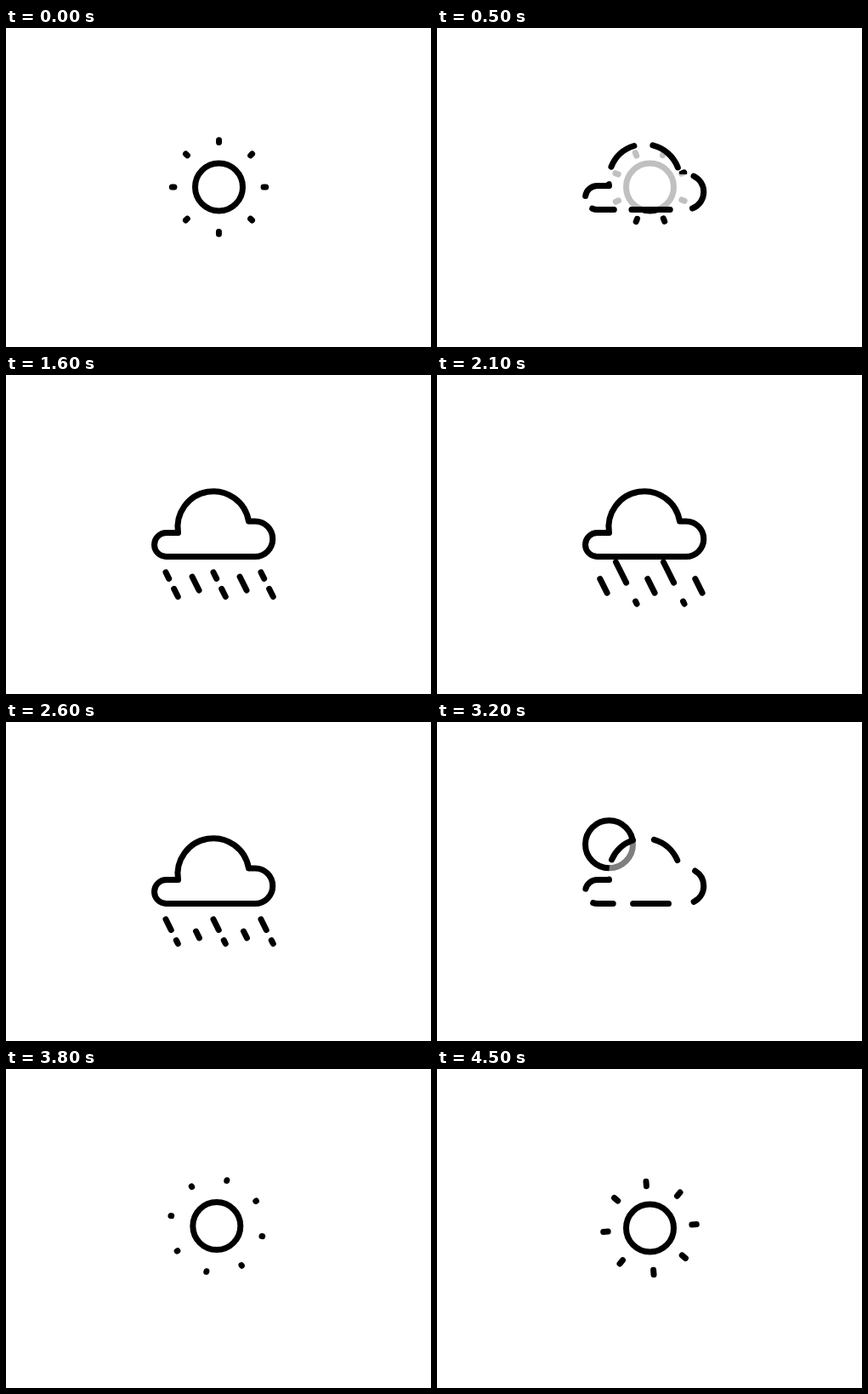
Recreate the animation shown at these times as an HTML page with a canvas. Size 500x375 px, loop 4.6 s.

```html
<!DOCTYPE html>
<html lang="en">
<head>
<meta charset="utf-8">
<title>Weather loop</title>
<style>
  html, body { margin: 0; width: 100%; height: 100%; overflow: hidden; background: #fff; }
  canvas { display: block; }
</style>
</head>
<body>
<canvas width="500" height="375"></canvas>
<script>
const ctx = document.querySelector('canvas').getContext('2d');
const LOOP = 4600;
const cloud = new Path2D('M188.5 213.5a14 14 0 0 1 0-28h14A42 42 0 0 1 285.5 172h7.5a20.75 20.75 0 0 1 0 41.5z');
const cells = [56, 59, 64, 75, 71, 43]; // outline pieces between the gaps
const firstGap = 13.75;

const clamp = v => Math.max(0, Math.min(1, v));
const ramp = (t, from, to) => clamp((t - from) / (to - from));
const quint = u => u < 0.5 ? 16 * u ** 5 : 1 - 16 * (1 - u) ** 5;

function line(x1, y1, x2, y2) {
  ctx.beginPath();
  ctx.moveTo(x1, y1);
  ctx.lineTo(x2, y2);
  ctx.stroke();
}

function drawSun(t) {
  const away = quint(ramp(t, 2630, 3030)) - quint(ramp(t, 3530, 3930));
  ctx.save();
  ctx.translate(250.5 - 48 * away, 187 - 43.2 * away);
  ctx.beginPath();
  ctx.arc(0, 0, 28, 0, 2 * Math.PI);
  ctx.stroke();

  const phase = (t - 2350) % 900;
  if (phase < 640) {
    const radius = u => 55.2 - 15 * (1 - clamp(u)) ** 2;
    const inner = radius((phase - 155) / 510);
    const outer = radius(phase / 400);
    const s = (t - LOOP) / 1000;
    ctx.rotate((48.9 * s + (s < 0 ? 10.5 : -10.5) * s * s) * Math.PI / 180);
    for (let i = 0; i < 8; i++) {
      line(0, -inner, 0, -outer);
      ctx.rotate(Math.PI / 4);
    }
  }
  ctx.restore();
}

function drawCloud(t) {
  const shown = ramp(t, 150, 700) - ramp(t, 2975, 3525);
  if (shown <= 0) return;
  ctx.globalAlpha = ramp(t, 200, 600) - ramp(t, 3000, 3400);
  ctx.fill(cloud);
  ctx.globalAlpha = 1;
  if (shown < 1) {
    const half = (1 - shown) / 2;
    ctx.setLineDash(cells.flatMap((c, i) => [c * shown, (c + cells[(i + 1) % cells.length]) * half]));
    ctx.lineDashOffset = -(firstGap + cells[0] * half);
  }
  ctx.stroke(cloud);
  ctx.setLineDash([]);
}

// A streak that wraps around along a slanted track
function drawDrop(x, y, height, tail, length) {
  if (length <= 0) return;
  const piece = (a, b) => line(x + a * height / 2, y + a * height, x + b * height / 2, y + b * height);
  tail -= Math.floor(tail);
  const head = tail + length;
  piece(tail, Math.min(head, 1));
  if (head > 1) piece(0, head - 1);
}

function drawRain(t) {
  const s = t / 1000;
  const long = Math.min(0.32 + 0.37 * (s - 0.9), 0.58, 1.15 * (3.1 - s));
  const late = Math.min(0.46 * (s - 0.9), 1.07 * (2.75 - s));
  const longTail = 0.43 + 1.18 * (s - 0.9) - long;
  const lateTail = 0.35 + 1.18 * (s - 1.6);
  for (const x of [188, 244, 300]) drawDrop(x, 232, 28.5, longTail, long);
  for (const x of [210.5, 266.5]) drawDrop(x, 220, 49, lateTail, late);
}

function frame(now) {
  const t = now % LOOP;
  ctx.fillStyle = '#fff';
  ctx.fillRect(0, 0, 500, 375);
  ctx.strokeStyle = '#000';
  ctx.lineWidth = 7;
  ctx.lineCap = ctx.lineJoin = 'round';
  const sunTime = t < 700 ? t + LOOP : t;
  if (sunTime >= 2700) drawSun(sunTime);
  drawCloud(t);
  if (t >= 900 && t < 3100) drawRain(t);
}

const start = performance.now();
(function tick() {
  frame(performance.now() - start);
  requestAnimationFrame(tick);
})();
</script>
</body>
</html>
```
